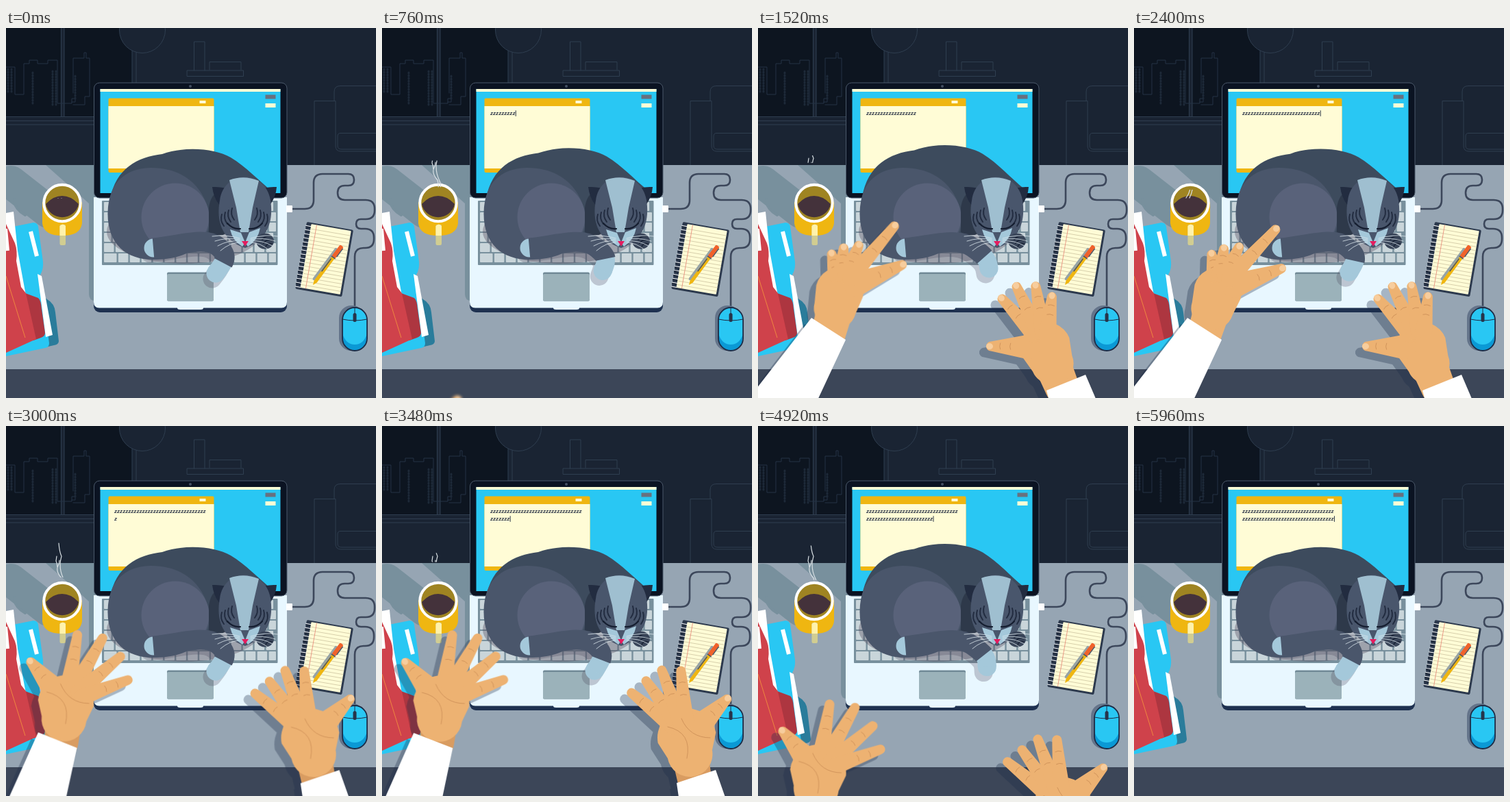
Animation of 540 by 540 pixels, one loop 6 s. Source, as an HTML page:

```html
<!DOCTYPE html>
<html lang="en">
<head>
<meta charset="utf-8">
<title>Cat on the keyboard</title>
<style>
html, body { margin: 0; height: 100%; overflow: hidden; background: #1a2433; }
svg { display: block; width: 100vw; height: 100vh; }
.line { fill: none; stroke-linecap: round; stroke-linejoin: round; }
text { font: italic bold 8.1px "Liberation Sans", Arial, sans-serif; fill: #2c3547; }
</style>
</head>
<body>
<svg viewBox="0 0 540 540">
  <!-- room -->
  <rect width="540" height="540" fill="#1a2433"/>
  <rect width="184" height="129" fill="#0d1520"/>
  <rect x="80" width="5" height="129" fill="#1a2433"/>
  <g class="line" stroke="#2f3e50">
    <path d="M80.500 0V129M85 0V129M184 0V80M190 0V80M0 129.500H129M0 135.500H129M0 141H129"/>
    <path d="M0 57H13V97H26V52H34V47H46V52H61V47H75V110H96V103H101V108H96M98 95V44H114V36H117V44H122V100H115V112H98" stroke="#253345"/>
    <path d="M3 60V96M8 60V96M39 65V112M68 63V112M73 63V112M101 70V105" stroke="#1d2938" stroke-width="3" stroke-dasharray="1 3"/>
    <circle cx="199" cy="3" r="33.500" fill="#1a2433"/>
    <path d="M264.500 62H346.500V70.500H264.500ZM274.500 62V20H290V62M297 61V49.500H343V61"/>
    <path d="M450 200V106.500H481V172Q481 180 489 180H540M479 106V93Q479 84.500 488 84.500H540M540 153.500H488Q484 153.500 484 158V172Q484 177 490 177H540"/>
  </g>

  <!-- desk -->
  <rect y="200" width="540" height="298" fill="#96a5b3"/>
  <rect y="498" width="540" height="42" fill="#3c4658"/>
  <path d="M58 200H130V398Q121 398 121 388V256Z" fill="#78909d"/>
  <path d="M7 225L62 268" class="line" stroke="#78909d" stroke-width="48"/>
  <path d="M12 250Q12 264 28 273" class="line" stroke="#78909d" stroke-width="4"/>
  <rect y="190" width="128" height="10" fill="#1a2433"/>

  <!-- folders -->
  <path d="M40 380L60 396Q71 402 72 415L77 457Q77 462 70 463L40 470Z" fill="#2a7c9b"/>
  <path d="M0 292L40 284Q46 284 47 290L54 341Q55 352 50 360L63 460Q63 466 57 467L0 479Z" fill="#29c7f3"/>
  <path d="M46 359L52 362L68 448L58 451Z" fill="#fff"/>
  <path d="M36 297L45 333" stroke="#fff" stroke-width="6"/>
  <path d="M0 270L11 268L17 325L33 412L0 420Z" fill="#fff"/>
  <path d="M20 384L47 394Q51 397 52 410L57 445Q57 450 51 452L40 456Z" fill="#ad3640"/>
  <path d="M0 286L13 314Q17 325 15 340L22 378L29 387L44 454L0 474Z" fill="#cf424b"/>
  <path d="M-1 293L2 325" stroke="#fff" stroke-width="6"/>
  <path d="M0 362L28 452" stroke="#ee8640"/>

  <!-- mug -->
  <path d="M53 254H111V285Q109 303 82 303Q55 303 53 285Z" fill="#efb611"/>
  <rect x="78.500" y="287" width="8.500" height="30" rx="2" fill="#d1cd91"/>
  <path d="M78.500 289Q83 284 87 289V303H78.500Z" fill="#fff2ac"/>
  <circle cx="82" cy="255.500" r="26.700" fill="#9f8422" stroke="#fff" stroke-width="4"/>
  <path d="M58 257Q69 245 82 245T106 257A24.500 24 0 0 1 58 257Z" fill="#44323b"/>
  <clipPath id="steamClip"><rect x="60" width="40"/></clipPath>
  <g class="line" stroke="#d9e0e4" stroke-width="1.200" clip-path="url(#steamClip)">
    <path d="M81 248Q88 234 84 223Q76 207 81 190Q78 184 77 171"/>
    <path d="M76 248Q85 236 81 222Q72 212 76 204Q78 201 78 196M75 206Q75 201 73 197L74 190"/>
  </g>

  <!-- laptop -->
  <rect x="128" y="360" width="282" height="55" rx="9" fill="#1e3150"/>
  <path d="M128 247H410V400Q410 408.500 402 408.500H288Q288 411 284 411H254Q250 411 250 408.500H136Q128 408.500 128 400Z" fill="#e8f7ff"/>
  <rect x="128.500" y="80" width="281.500" height="168" rx="8" fill="#0b1322" stroke="#4b596a"/>
  <circle cx="269" cy="85" r="2" fill="#445062"/>
  <rect x="137.500" y="89" width="263" height="152" fill="#29c7f3"/>
  <rect x="137.500" y="89" width="263" height="4" fill="#fffcd6"/>
  <rect x="149.500" y="102.500" width="154" height="108.500" rx="2" fill="#efb611"/>
  <rect x="149.500" y="114" width="154" height="91" fill="#fffcd6"/>
  <rect x="282.500" y="106" width="9" height="4" fill="#fffcd6"/>
  <rect x="378.500" y="97.500" width="15" height="6" fill="#68717f"/>
  <rect x="378.500" y="110" width="15" height="6" fill="#fffcd6"/>
  <text id="row0" x="158" y="127"></text>
  <text id="row1" x="158" y="138"></text>
  <rect id="cursor" width="1" height="8.500" fill="#2c3547"/>
  <rect x="140" y="252" width="256.500" height="94" rx="1" fill="#78909d"/>
  <g id="keys" fill="#c9d5da"></g>
  <rect x="235" y="356.500" width="68" height="42" rx="2" fill="#708996"/>
  <rect x="235" y="359" width="68" height="39.500" rx="2" fill="#9bb2ba"/>

  <!-- cable and mouse -->
  <path id="cable" class="line" stroke="#3c475b" stroke-width="2.600"/>
  <rect x="409" y="259" width="9" height="10" rx="1" fill="#fff"/>
  <rect x="486" y="405" width="37" height="66" rx="18" fill="#64748a"/>
  <rect x="491" y="408" width="36" height="63" rx="18" fill="#0b99d5"/>
  <path d="M491 426A18 18 0 0 1 527 426V446Q522 462 509 462T491 446Z" fill="#29c7f3"/>
  <path d="M491 425Q509 429 527 425M509 408V418" class="line" stroke="#1d2c46"/>
  <rect x="491" y="408" width="36" height="63" rx="18" fill="none" stroke="#1d2c46" stroke-width="1.800"/>
  <rect x="506.500" y="416" width="5" height="13" rx="2.500" fill="#26344b"/>

  <!-- notebook and pen -->
  <g transform="translate(439 283) rotate(9.800)">
    <rect width="69" height="99" rx="2" fill="#2c394d"/>
    <rect x="7" y="2" width="59" height="94" rx="1" fill="#fffcd6"/>
    <path id="rules" stroke="#cfc9a4" stroke-width=".8"/>
    <path d="M15 2V96" stroke="#e88b7a" stroke-width=".8"/>
    <path d="M3.500 5V96" stroke="#fff" stroke-width="8" stroke-dasharray="1 5"/>
    <path d="M3 6.500V96" stroke="#1f2a3b" stroke-width="7" stroke-dasharray="1.800 4.200"/>
  </g>
  <g transform="translate(448 375) rotate(-53.500)">
    <path d="M8 -4H62" class="line" stroke="#96a3a6" stroke-width="4"/>
    <path d="M0 0L6 -2.500H50V2.500H6Z" fill="#efb611"/>
    <rect x="50" y="-3.200" width="21" height="6.400" rx="2" fill="#f0622b"/>
    <path d="M24 -1.500H46M50 3V-3M54 3.500H68" class="line" stroke="#4a5668" stroke-width="1.500"/>
  </g>

  <!-- cat -->
  <ellipse cx="260" cy="297" rx="113" ry="47" fill="#4d4358" opacity=".35"/>
  <path class="tail line" transform="translate(-5 8)" stroke="#4c4a5e" stroke-width="27" opacity=".28"/>
  <path id="back" d="M152 250C160 205 192 188 228 184C262 172 305 176 328 189C350 202 370 224 388 238L370 290L200 318Z" fill="#3d4b5d"/>
  <path d="M148.500 270C149 235 165 206 210 204C265 203 297 240 297 285C290 330 245 338 215 338C175 338 148 315 148.500 270Z" fill="#4a566b"/>
  <circle cx="247" cy="276" r="49.500" fill="#59627a"/>
  <path d="M296 262Q300 236 320 238L332 290Q318 310 296 298Z" fill="#2e394a"/>
  <path class="tail line" pathLength="100" stroke="#a4c8da" stroke-width="27" stroke-dasharray="0 99 9"/>
  <path class="tail" pathLength="100" fill="none" stroke="#a4c8da" stroke-width="27" stroke-dasharray="0 85 15"/>
  <path class="tail" pathLength="100" fill="none" stroke="#4a566b" stroke-width="29" stroke-dasharray="87 200"/>
  <path d="M301 232Q318 231 334 238L312 259Q303 248 301 232ZM395 232Q378 231 364 238L386 257Q394 246 395 232Z" fill="#222c40"/>
  <path d="M312 252C318 206 378 206 386 251C392 290 375 312 349 321C322 312 305 290 312 252Z" fill="#49566c"/>
  <path d="M326 222Q347 214 369 223L360 262L354 298H342L336 262Z" fill="#9fbfd0"/>
  <path d="M327 294L343 299L349 313L345 319Q331 311 327 294ZM371 292L355 298L349 313L353 319Q368 309 371 292Z" fill="#a4c8da"/>
  <path id="stripes" class="line" stroke="#222c40" stroke-width="2"/>
  <path d="M323 285Q331 294 342 293M374 285Q366 294 355 293" class="line" stroke="#151e30" stroke-width="2.200"/>
  <ellipse cx="378" cy="311" rx="13" ry="11.500" fill="#3a465a"/>
  <path d="M374 309Q378 303 386 304M376 314Q381 307 389 310M379 319Q382 313 388 315" class="line" stroke="#202a3d" stroke-width="2"/>
  <path d="M344 311H354L349 318.500Z" fill="#e51c5f"/>
  <path id="whiskers" class="line" stroke="#dce8ee" stroke-width=".8"/>

  <g id="hands"></g>
</svg>
<script>
const $ = id => document.getElementById(id);
const LOOP = 6000, CHAR = 84.4, ROW = 33, CHAR_W = 4.05;
const SKIN = '#edb272', CREASE = '#d1945b', NAIL = '#f7cd9d';
const clamp = (v, lo = 0, hi = 1) => Math.min(hi, Math.max(lo, v));
const ramp = (t, a, b) => clamp((t - a) / (b - a));
const mix = (a, b, u) => a + (b - a) * u;
const inOut = u => u < .5 ? 4 * u ** 3 : 1 - 4 * (1 - u) ** 3;
const polar = ([x, y], angle, r) => {
  const a = angle * Math.PI / 180;
  return [x + r * Math.cos(a), y + r * Math.sin(a)];
};

// Alternating horizontal and vertical runs with rounded corners
function route(x, y, stops) {
  const pts = [[x, y]];
  stops.forEach((v, i) => pts.push(i % 2 ? [pts[i][0], v] : [v, pts[i][1]]));
  const span = (a, b) => Math.hypot(b[0] - a[0], b[1] - a[1]);
  const toward = (a, b, r) => a.map((v, k) => mix(v, b[k], r / span(a, b)));
  let d = 'M' + pts[0];
  for (let i = 1; i < pts.length - 1; i++) {
    const [a, b, c] = pts.slice(i - 1, i + 2);
    const r = Math.min(13, span(a, b) / 2, span(b, c) / 2);
    d += `L${toward(b, a, r)}Q${b} ${toward(b, c, r)}`;
  }
  return d + 'L' + pts[pts.length - 1];
}

// Rounded limb from a to b, w0 wide at a and w1 wide at b
function taper(a, b, w0, w1, fill = SKIN) {
  const len = Math.hypot(b[0] - a[0], b[1] - a[1]);
  const nx = (a[1] - b[1]) / len / 2, ny = (b[0] - a[0]) / len / 2;
  const at = (p, w) => [p[0] + nx * w, p[1] + ny * w];
  return `<path fill="${fill}" d="M${at(a, w0)}L${at(b, w1)}A${w1 / 2} ${w1 / 2} 0 0 0 ${at(b, -w1)}L${at(a, -w0)}A${w0 / 2} ${w0 / 2} 0 0 0 ${at(a, w0)}"/>`;
}

function finger(center, angle, reach, w0, nail) {
  const w1 = 14, tip = polar(center, angle, reach - 3);
  let marks = '';
  for (const f of [.62, .8]) {
    const p = polar(center, angle, reach * f);
    marks += `M${polar(p, angle + 90, 5)}Q${polar(p, angle, 2)} ${polar(p, angle - 90, 4)}`;
  }
  const [nx, ny] = polar(tip, angle, 2);
  return taper(polar(center, angle, 26), tip, w0, w1) +
    `<path class="line" stroke="${CREASE}" d="${marks}"/>` +
    (nail ? `<ellipse cx="${nx}" cy="${ny}" rx="5" ry="4.500" transform="rotate(${angle} ${nx} ${ny})" fill="${NAIL}"/>` : '');
}

// Fingers fan out from the palm centre by equal angles
const hands = {
  backL: { center: [122, 385], width: 70, wrist: [103, 446], fan: -99, step: 17.3, reach: [58, 66, 75, 127], thumb: [-20, 102], sleeve: 'M78 423L128 455L78 562L-30 562Z' },
  backR: { center: [420, 466], width: 74, wrist: [444, 525], fan: -132, step: 16.3, reach: [98, 101, 93, 77], thumb: [-179, 83], sleeve: 'M421 529L478 506L502 562H430Z' },
  palmL: { center: [86, 405], width: 82, wrist: [80, 462], fan: -81, step: 20, reach: [104, 112, 108, 100], thumb: [-131, 82], palm: true, sleeve: 'M46 448L103 470L84 562H-4Z' },
  palmR: { center: [445, 455], width: 86, wrist: [456, 515], fan: -141, step: 15.3, reach: [107, 105, 108, 101], thumb: [-44, 84], palm: true, sleeve: 'M430 521L487 502L508 562H436Z' },
};

function buildHand(id, h) {
  const [x, y] = h.center, back = !h.palm;
  const fingers = h.reach.map((r, i) => finger(h.center, h.fan + i * h.step, r, 25, back));
  const lines = h.palm
    ? `M${x - 28} ${y - 16}Q${x + 8} ${y - 8} ${x} ${y + 30}M${x - 8} ${y - 28}Q${x + 4} ${y} ${x + 34} ${y}` : '';
  return `<g id="${id}"><g id="${id}Skin">` +
    taper(h.center, h.wrist, 56, 50, back ? SKIN : '#d99c61') +
    taper(h.center, h.center.map((v, k) => mix(v, h.wrist[k], .4)), h.width, back ? 62 : 66) +
    finger(h.center, h.thumb[0], h.thumb[1], 36, true) + fingers.join('') +
    `<path class="line" stroke="${CREASE}" d="${lines}"/></g><path d="${h.sleeve}" fill="#fff"/></g>`;
}
$('hands').innerHTML = Object.entries(hands).map(e => buildHand(...e)).join('');
$('cable').setAttribute('d', route(417, 264,
  [449, 213, 508, 230, 484, 251, 538, 279, 511, 293, 537, 321, 509, 418]));

let keys = '', rules = '', stripes = '', whiskers = '';
for (let r = 0; r < 6; r++)
  for (let c = 0; c < 15; c++) {
    const shift = r % 3 * 4, x = 143 + c * 16.9 + (c ? shift - 4 : 0);
    const w = Math.min(c ? 14.5 : 10.5 + shift, 394 - x);
    keys += `<rect x="${x}" y="${254 + r * 15}" width="${w}" height="13" rx="1"/>`;
  }
for (let y = 9; y < 96; y += 5.5) rules += `M8 ${y}H66`;
for (const side of [-1, 1])
  for (let i = 0; i < 4; i++) {
    const x = 348 + side * (18 + i * 5), y = 263 + i * 3, out = side * (40 - i * 4);
    stripes += `M${x} ${y}Q${x + side * 3} ${y + 9} ${x - side * 3} ${y + 17}`;
    whiskers += `M${349 + side * 8} ${307 + i * 2}q${out / 2} ${i * 2 - 6} ${out} ${i * 5 - 3}`;
  }
$('keys').innerHTML = keys;
$('rules').setAttribute('d', rules);
$('stripes').setAttribute('d', stripes);
$('whiskers').setAttribute('d', whiskers);

function drawCat(t) {
  const u = t % 3000 / 1500, s = inOut(u < 1 ? u : 2 - u);
  const d = `M215 321C250 318 290 304 ${308 + 5 * s} ${318 + 2 * s}S${320 + 15 * s} 340 ${306 + 31 * s} ${358 - 7 * s}`;
  document.querySelectorAll('.tail').forEach(e => e.setAttribute('d', d));
  $('back').setAttribute('transform', `translate(0 338) scale(1 ${1 + .036 * s * s}) translate(0 -338)`);
}

function drawText(t) {
  const k = Math.floor(t / CHAR), second = k > ROW;
  const counts = [Math.min(k, ROW), clamp(k - ROW - 1, 0, ROW)];
  counts.forEach((c, i) => $('row' + i).textContent = 'z'.repeat(c));
  $('cursor').setAttribute('x', 158.3 + counts[+second] * CHAR_W);
  $('cursor').setAttribute('y', second ? 131.3 : 120.3);
  $('cursor').setAttribute('visibility', t % 500 < 250 ? 'hidden' : 'visible');
}

// A window slides up the steam strands, opening and then closing
function drawSteam(t) {
  const p = t % 2000, rect = document.querySelector('#steamClip rect');
  const top = mix(248, 170, ramp(p, 300, 960)) + 16 * ramp(p, 1100, 1500);
  const end = mix(249, 186, ramp(p, 400, 1750));
  rect.setAttribute('y', top);
  rect.setAttribute('height', Math.max(0, end - top));
}

function place(id, shown, x, y, angle, scale, blur) {
  const g = $(id), [px, py] = hands[id].wrist;
  g.style.display = shown ? '' : 'none';
  g.setAttribute('transform', `translate(${px + x} ${py + y}) rotate(${angle}) scale(${scale} 1) translate(${-px} ${-py})`);
  g.style.filter = (blur > .1 ? `blur(${blur}px) ` : '') + 'drop-shadow(-10px 9px 0 rgba(28,42,72,.32))';
}

function drawHands(t) {
  const enter = 1 - ramp(t, 760, 1280), l = enter ** 2, r = enter ** 3;
  const poking = t > 1280 && t < 2400;
  const poke = poking ? -3.5 * Math.sin(Math.PI * (t - 1280) / 373.4) ** 2 : 0;
  const flip = ramp(t, 2680, 3080), turn = inOut(flip), rest = 1 - turn;
  const width = Math.max(.12, Math.abs(Math.cos(Math.PI * turn)));
  const back = t > 760 && flip < .5, palm = flip >= .5 && t < 5100;
  const drop = ramp(t, 4640, 5100) ** 2 * 270;
  const blur = enter * 2 + Math.sin(Math.PI * flip) + drop / 200;
  const drift = ramp(t, 3080, 4600);

  $('backLSkin').setAttribute('transform', `rotate(${poke} ${hands.backL.wrist})`);
  place('backL', back, -97 * l - 23 * turn, 250 * l + 16 * turn, -20 * turn, width, blur);
  place('backR', back, -40 * r + 12 * turn, 247 * r - 10 * turn, 10 * turn - 30 * l, width, blur);
  place('palmL', palm, 23 * rest + drift, drop - 16 * rest, 20 * rest + drift * .6, width, blur);
  place('palmR', palm, -12 * rest, drop + 10 * rest, -10 * rest, width, blur);
}

function frame(now) {
  const t = now % LOOP;
  drawCat(t);
  drawText(t);
  drawSteam(t);
  drawHands(t);
  requestAnimationFrame(frame);
}
frame(0);
</script>
</body>
</html>
```
